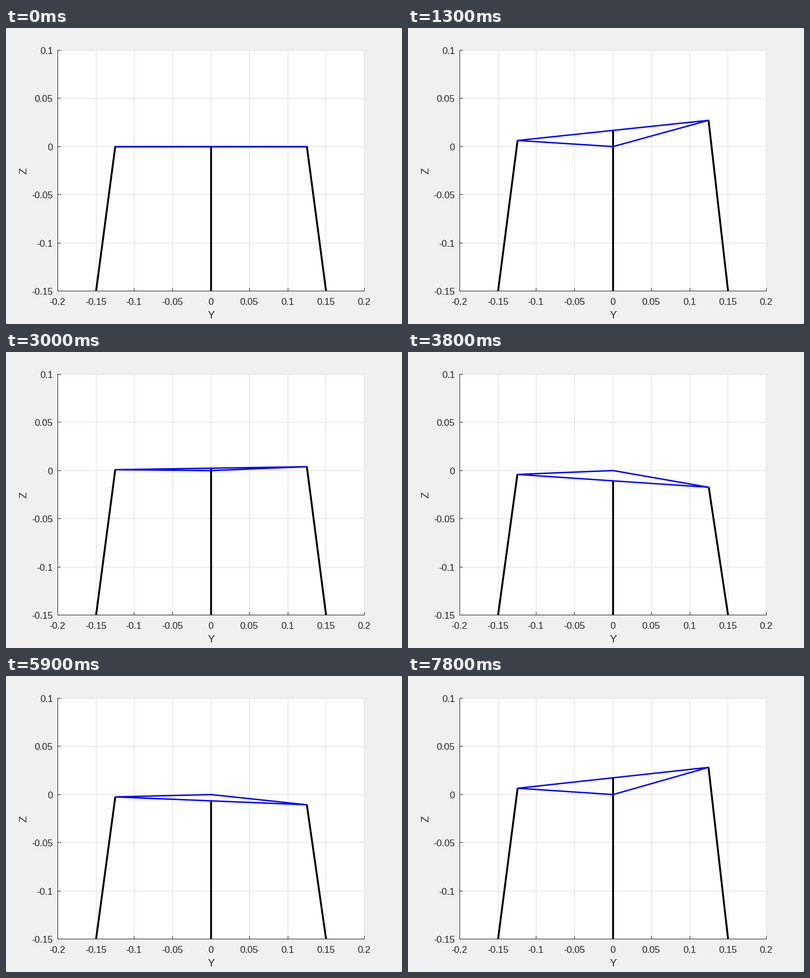
A matplotlib script that plays this animation: 700 px wide and 525 px high, repeating every 8 s.

```python
import numpy as np
import matplotlib.pyplot as plt
from matplotlib.animation import FuncAnimation

W, H = 700, 525
LEFT, RIGHT, TOP, BOTTOM = 91.5, 633.5, 39.5, 466.5
INK = "#262626"
GRID = "#dedede"
PX = 0.72  # points per pixel at 100 dpi

TILT = np.radians(5)
LENGTH, HALF = 0.2, 0.125  # platform reach and half width
FOOT_Y, FOOT_Z = 0.15, -0.15

plt.rcParams["font.family"] = "Liberation Sans"
plt.rcParams["path.snap"] = False  # coordinates already sit on pixel centres
fig = plt.figure(figsize=(W / 100, H / 100), dpi=100, facecolor="#f0f0f0")
ax = fig.add_axes([0, 0, 1, 1])
ax.set(xlim=(0, W), ylim=(H, 0))
ax.axis("off")


def px(y):
    return LEFT + (np.asarray(y) + 0.2) / 0.4 * (RIGHT - LEFT)


def py(z):
    return BOTTOM - (np.asarray(z) + 0.15) / 0.25 * (BOTTOM - TOP)


def pixel_centre(v):
    return np.rint(v - 0.5) + 0.5


def stroke(xs, ys, color, width, **kw):
    kw = {"solid_capstyle": "butt", "snap": False, **kw}
    return ax.plot(xs, ys, color=color, lw=width * PX, **kw)[0]


def label(x, y, s, size=16.67, **kw):
    ax.text(x, y, s, size=size * PX, color=INK, va="baseline", **kw)


def draw_axes():
    ax.add_patch(plt.Rectangle((LEFT, TOP), RIGHT - LEFT, BOTTOM - TOP,
                               fc="white", ec="none", snap=False))
    y_ticks = np.round(np.arange(-4, 5) * 0.05, 2)
    z_ticks = np.round(np.arange(-3, 3) * 0.05, 2)
    xs = pixel_centre(px(y_ticks))
    ys = pixel_centre(py(z_ticks))
    for x in xs:
        stroke([x, x], [TOP - 0.5, BOTTOM], GRID, 1)
    for y in ys:
        stroke([LEFT, RIGHT + 0.5], [y, y], GRID, 1)
    for x, v in zip(xs, y_ticks):
        stroke([x, x], [BOTTOM, BOTTOM - 5.5], INK, 1)
        label(x - 0.5, 491, f"{v + 0:g}", ha="center")
    for y, v in zip(ys, z_ticks):
        stroke([LEFT, LEFT + 5.5], [y, y], INK, 1)
        label(83, y + 6.5, f"{v + 0:g}", ha="right")
    stroke([LEFT, LEFT, RIGHT + 0.5], [TOP - 0.5, BOTTOM, BOTTOM], INK, 1,
           solid_joinstyle="miter")
    label(363, 515, "Y", 18.33, ha="center")
    label(36.5, 253.5, "Z", 18.33, ha="center", rotation=90,
          rotation_mode="anchor")


draw_axes()
legs = [stroke([], [], "black", 3.33) for _ in range(3)]
platform = stroke([], [], "blue", 2.5, solid_joinstyle="round")


def update(i):
    t = min(i, 78) * 0.1
    angle = TILT * np.sin(t)  # roll and pitch share one angle
    lift = LENGTH * np.sin(angle)
    dy = HALF * np.cos(angle)
    dz = HALF * np.sin(angle) * np.cos(angle)
    joints = [(-dy, lift - dz), (0, lift), (dy, lift + dz)]
    for leg, foot, (y, z) in zip(legs, (-FOOT_Y, 0, FOOT_Y), joints):
        leg.set_data(px([foot, y]), py([FOOT_Z, z]))
    ring = np.array([(0, 0), joints[0], joints[2], (0, 0)])
    platform.set_data(px(ring[:, 0]), py(ring[:, 1]))
    return [*legs, platform]


anim = FuncAnimation(fig, update, frames=80, interval=100, repeat=True,
                     repeat_delay=0, blit=False)
plt.show()
```
